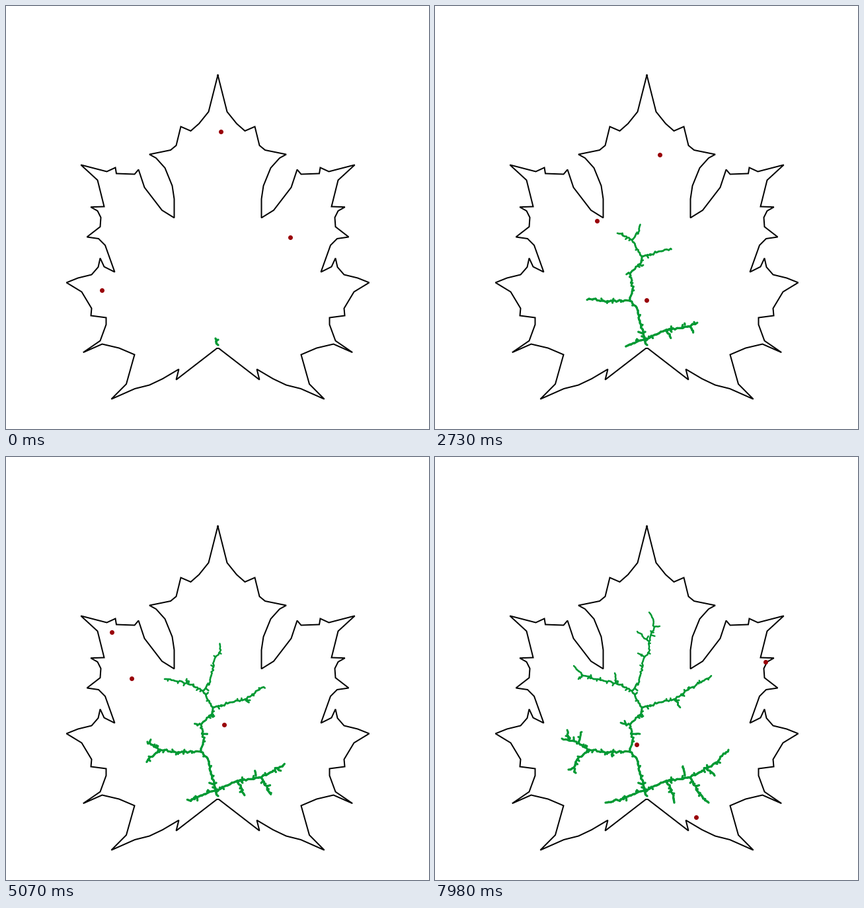
These frames come from a looping animation (640 by 640 pixels, 8000 ms). A matplotlib script:

```python
import math
import random

import matplotlib.pyplot as plt
from matplotlib.animation import FuncAnimation
from matplotlib.collections import LineCollection
from matplotlib.path import Path

SIZE, DPI = 640, 100
PX = 72 / DPI
LOOP, TICK, STEP = 8000, 20, 30
STEPS = math.ceil(LOOP / STEP)
GREEN, RED = "#009933", "#990008"

rng = random.Random(12)

# Left half of the leaf from tip to stem; the right half mirrors it.
half = [
    (320.5, 106), (306.5, 160), (292, 178), (279.5, 189), (264.5, 182.5),
    (257.5, 211), (249, 218), (217, 224.5), (227, 230), (240.5, 245),
    (251.5, 272), (254.5, 292), (254.5, 320.5), (236, 309), (209.5, 274.5),
    (200.5, 247.5), (194.5, 254.5), (167, 253.5), (165.5, 244.5),
    (152.5, 250.5), (114.5, 241), (138.5, 263.5), (148.5, 303.5),
    (129.5, 304.5), (138.5, 310), (143.5, 320), (142.5, 334), (122.5, 349.5),
    (140, 352), (150, 362), (164.5, 402.5), (148.5, 394.5), (142.5, 381.5),
    (139.5, 395), (129.5, 406.5), (109, 411.5), (91.5, 418.5), (114.5, 432.5),
    (129.5, 457.5), (128.5, 468.5), (151.5, 471.5), (151.5, 482),
    (142.5, 506.5), (118, 523.5), (145.5, 511.5), (171, 517.5),
    (194.5, 527.5), (182, 572), (160.5, 594), (195, 579), (217, 573.5),
    (237, 564), (261.5, 549.5), (257.5, 565.5), (319, 518),
]


def sharpen(points):
    """Push narrow corners outwards, since sharp miters get cut off."""
    z = [complex(*p) for p in points]
    out = []
    for a, p, b in zip(z[-1:] + z[:-1], z, z[1:] + z[:1]):
        out_dir = (p - a) / abs(p - a) + (p - b) / abs(p - b)
        if abs(out_dir) > 1.9:
            p += 0.7 * out_dir
        out.append((p.real, p.imag))
    return out


outline = sharpen(half + [(641 - x, y) for x, y in reversed(half[1:])])
outline.append(outline[0])
leaf = Path(outline, closed=True)

twigs = []  # (birth step, start, end)


def grow(*points, ease=0.7, stop=STEPS - 1):
    """Grow a wobbly shoot, starting when the nearest twig is there."""
    near = min(twigs, key=lambda s: math.dist(s[2], points[0]), default=(0,))
    start = near[0]
    total = sum(map(math.dist, points, points[1:]))
    done, prev = 0, points[0]
    for p, q in zip(points, points[1:]):
        length = math.dist(p, q)
        n = max(1, round(length / 2.6))
        heading = math.atan2(q[1] - p[1], q[0] - p[0])
        for i in range(1, n + 1):
            f = i / n
            wobble = 0.75 if i < n else 0
            node = (p[0] + (q[0] - p[0]) * f + rng.gauss(0, wobble),
                    p[1] + (q[1] - p[1]) * f + rng.gauss(0, wobble))
            reach = (done + length * f) / total
            birth = start + (stop - start) * reach ** (1 / ease)
            twigs.append((birth, prev, node))
            if stop and rng.random() < 0.22:
                bud(birth, node, heading)
            prev = node
        done += length


def bud(birth, node, heading):
    turn = heading + rng.choice((-1, 1)) * rng.uniform(0.9, 1.6)
    r = min(2 + rng.expovariate(0.7), 8)
    tip = (node[0] + r * math.cos(turn), node[1] + r * math.sin(turn))
    twigs.append((birth + rng.uniform(1, 60), node, tip))


# Seedling and trunk
grow((321, 513), (318, 508), (317, 503), stop=0)
grow((318, 508), (321, 505), stop=0)
grow((317, 503), (312, 484), (305, 456), (295, 446), (299, 428), (295, 405),
     (312, 388), (313, 379), (298, 354), ease=1, stop=66)

# Main veins
grow((298, 354), (309, 340), (317, 303), (325, 292), (324, 279), (332, 257),
     (330, 245), (324, 235))
grow((298, 354), (274, 342), (240, 336), (222, 329), (210, 316), ease=0.65)
grow((313, 379), (335, 373), (364, 366), (387, 349), (418, 331), ease=0.5)
grow((295, 446), (255, 446), (233, 443), (218, 433), (192, 426), ease=0.4)
grow((317, 505), (335, 497), (350, 490), (386, 485), (419, 467), (444, 443),
     ease=0.5)
grow((317, 503), (302, 510), (281, 518), (258, 523), ease=0.65)

# Side veins
grow((332, 257), (340, 256))
grow((324, 279), (306, 264))
grow((317, 303), (307, 297))
grow((274, 342), (272, 327))
grow((222, 329), (217, 336))
grow((364, 366), (371, 379))
grow((233, 443), (215, 458), (210, 470), (213, 478))
grow((210, 470), (202, 473))
grow((203, 428), (200, 413))
grow((217, 432), (222, 416))
grow((270, 443), (268, 453))
grow((350, 490), (358, 504), (362, 523))
grow((378, 482), (375, 468))
grow((386, 485), (399, 508), (414, 523))
grow((411, 472), (423, 482))
grow((295, 405), (281, 402))
grow((307, 392), (315, 392), stop=52)
grow((297, 419), (310, 419))

twigs.sort()
births = [birth for birth, _, _ in twigs]
segments = [(a, b) for _, a, b in twigs]
widths = [(2.4 + 0.9 * min(max((a[1] - 300) / 180, 0), 1)) * PX
          for a, _ in segments]

# Attractors: three fresh grid points inside the leaf on every step.
inside = [(x, y) for x in range(115, 550, 5) for y in range(145, 590, 5)
          if leaf.contains_point((x, y))]
dots = [rng.sample(inside, 3) for _ in range(STEPS)]

fig = plt.figure(figsize=(SIZE / DPI, SIZE / DPI), dpi=DPI, facecolor="white")
ax = fig.add_axes([0, 0, 1, 1])
ax.set_xlim(0, SIZE)
ax.set_ylim(SIZE, 0)
ax.axis("off")

ax.plot(*zip(*outline), color="black", lw=2 * PX, solid_joinstyle="miter",
        zorder=1)
veins = LineCollection([], colors=GREEN, capstyle="round", zorder=2)
ax.add_collection(veins, autolim=False)
marks, = ax.plot([], [], "o", color=RED, ms=7 * PX, mew=0, snap=False,
                 zorder=3)


def draw(i):
    k = min((i * TICK + TICK // 2) // STEP, STEPS - 1)
    n = sum(b <= k + 1e-6 for b in births)
    veins.set_segments(segments[:n])
    veins.set_linewidths(widths[:n])
    marks.set_data(*zip(*dots[k]))
    return veins, marks


anim = FuncAnimation(fig, draw, frames=LOOP // TICK, interval=TICK,
                     init_func=lambda: draw(0), repeat=True, repeat_delay=0)
plt.show()
```
